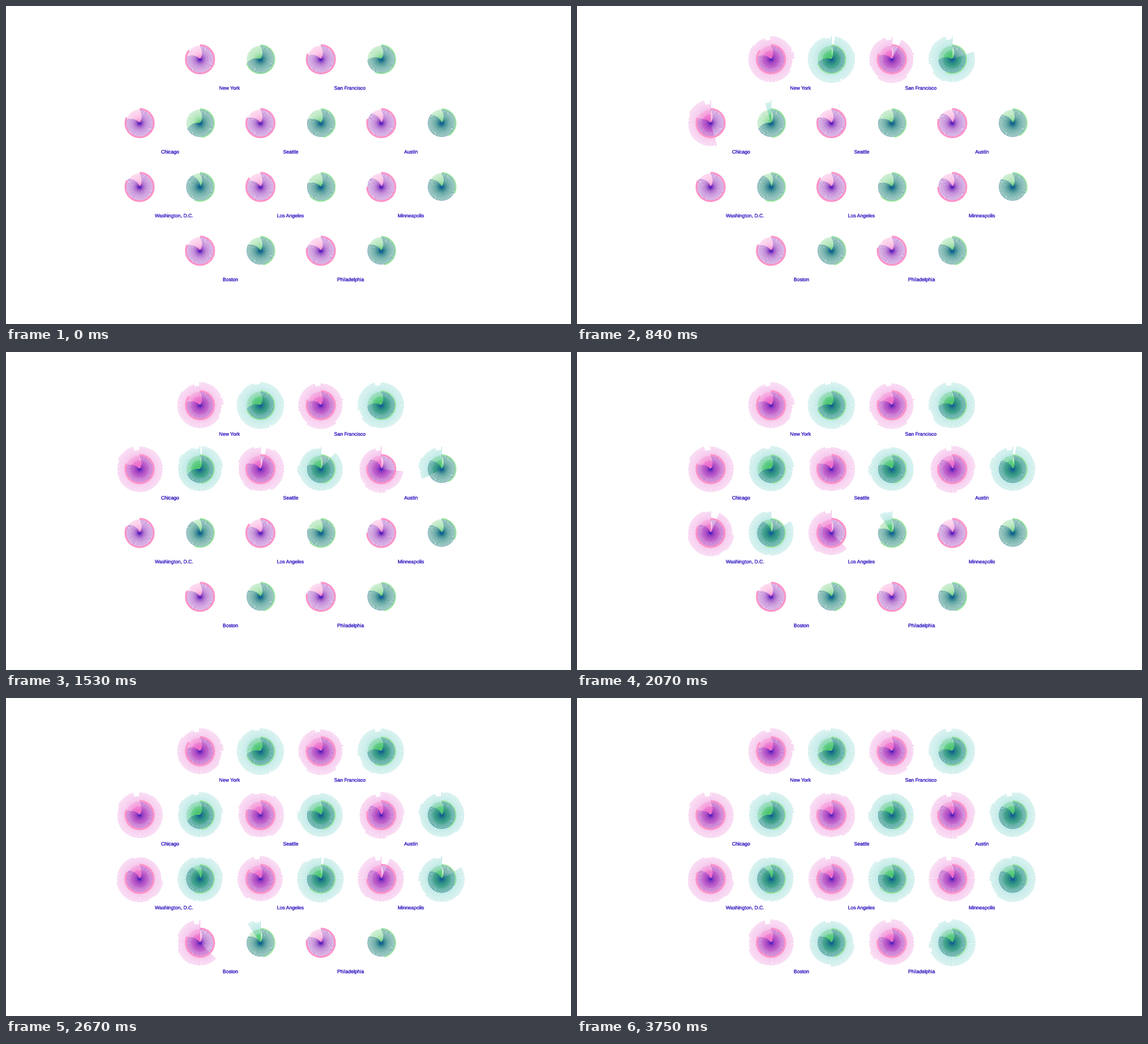
Recreate the animation shown at these times as a matplotlib script. Size 998x561 px, loop 3.78 s.

```python
import numpy as np
import matplotlib.pyplot as plt
from matplotlib.animation import FuncAnimation
from matplotlib.collections import LineCollection
from matplotlib.patheffects import withStroke

W, H, DPI = 998, 561, 64
FRAMES, INTERVAL = 126, 30
PX = 72 / DPI                 # points per pixel
RAYS = 100
STAGGER, GROW = 5, 30         # frames between dials, frames per dial
LEFT, TOP = 236, 94           # first grid point
STEP_X, STEP_Y = 106.7, 112.6
FAN_R, ARC_R = 24, 25
TWIST = 38                    # degrees of curl at the hub
LABEL = "#4531c8"

PINK = dict(arc="#ff93c8", arc_w=3.1, fan="#fb7fcb", fan_w=0.34,
            core="#4a1cbe", core_w=0.23, rays=("#d92cc0", "#e765cf"))
GREEN = dict(arc="#98e59b", arc_w=2.1, fan="#62cc72", fan_w=0.38,
             core="#125f96", core_w=0.32, rays=("#00b45c", "#55c7bf"))

# Name, label centre, then arc end and core sweep of the pink and green dials.
ROWS = [
    [("New York", 395, 309, 281, 252, 259),
     ("San Francisco", 607.5, 293, 285, 207, 267)],
    [("Chicago", 290, 293, 285, 176, 248),
     ("Seattle", 503, 292, 295, 171, 286),
     ("Austin", 715.5, 287, 314, 150, 307)],
    [("Washington, D.C.", 297, 298, 307, 203, 327),
     ("Los Angeles", 502.5, 309, 298, 231, 286),
     ("Minneapolis", 715.5, 270, 311, 117, 305)],
    [("Boston", 396.5, 295, 295, 169, 297),
     ("Philadelphia", 609, 283, 295, 168, 296)],
]

rng = np.random.default_rng(12)
fig = plt.figure(figsize=(W / DPI, H / DPI), dpi=DPI, facecolor="white")
ax = fig.add_axes([0, 0, 1, 1])
ax.set_xlim(0, W)
ax.set_ylim(H, 0)
ax.axis("off")


def polar(x, y, r, deg):
    """Point at radius r, degrees clockwise from the top."""
    a = np.radians(deg)
    return np.column_stack([x + r * np.sin(a), y - r * np.cos(a)])


def add_lines(segs, colors, width, z):
    lines = LineCollection(segs, colors=colors, linewidths=width * PX, zorder=z)
    lines.set_snap(False)
    ax.add_collection(lines, autolim=False)
    return lines


def fan(x, y, angles, color, width, z):
    t = np.linspace(0, 1, 9)
    curves = [polar(x, y, FAN_R * t, a + TWIST * (1 - t)) for a in angles]
    add_lines(curves, color, width, z)


def arc(x, y, r, end, color, width, z):
    add_lines([polar(x, y, r, np.linspace(0, end, 90))], color, width, z)


def ray_segments(x, y):
    """Straight rays, counter-clockwise from the top; inner and outer halves."""
    # Lengths hold steady for a stretch, then jump; the last stretch is short.
    starts = np.append(np.sort(rng.uniform(10, 325, 6)), 342)
    radii = np.append(rng.uniform(38, 42, 7), rng.uniform(33, 38))
    segs = []
    for a in -np.arange(RAYS) * 360 / RAYS:
        r = radii[np.searchsorted(starts, a % 360)]
        hub, mid, tip = polar(x, y, np.array([0, 16, r]), a)
        segs += [(hub, mid), (mid, tip)]
    return segs


def make_dial(style, x, y, arc_end, sweep):
    rays = add_lines([], style["rays"], 0.55, 1)
    angles = np.arange(RAYS) * 360 / RAYS
    fan(x, y, angles, style["fan"], style["fan_w"], 2)
    fan(x, y, angles[angles <= sweep], style["core"], style["core_w"], 3)
    arc(x, y, FAN_R, sweep, style["core"], style["core_w"], 3)
    arc(x, y, ARC_R, arc_end, style["arc"], style["arc_w"], 4)
    return rays, ray_segments(x, y)


dials = []
for row, cities in enumerate(ROWS):
    y = TOP + STEP_Y * row
    x = LEFT + STEP_X * (3 - len(cities))
    for name, label_x, *values in cities:
        ax.text(label_x, y + 53.6, name, color=LABEL, fontsize=8.7 * PX,
                family="Liberation Sans", ha="center", va="baseline",
                path_effects=[withStroke(linewidth=0.3 * PX, foreground=LABEL)])
        dials.append(make_dial(PINK, x, y, *values[:2]))
        dials.append(make_dial(GREEN, x + STEP_X, y, *values[2:]))
        x += 2 * STEP_X

# Cubic ease: slow start, quick middle, long settling.
S = np.linspace(0, 1, 400)
EASE_X = 3 * (1 - S) ** 2 * S * 0.33 + S ** 3
EASE_Y = 3 * S ** 2 - 2 * S ** 3


def update(frame):
    for i, (rays, segs) in enumerate(dials):
        age = np.clip((frame - STAGGER * i) / GROW, 0, 1)
        count = int(round(np.interp(age, EASE_X, EASE_Y) * RAYS))
        rays.set_segments(segs[:2 * count])
    return [rays for rays, _ in dials]


anim = FuncAnimation(fig, update, frames=FRAMES, interval=INTERVAL,
                     init_func=lambda: update(0), repeat=True, repeat_delay=0)
plt.show()
```
